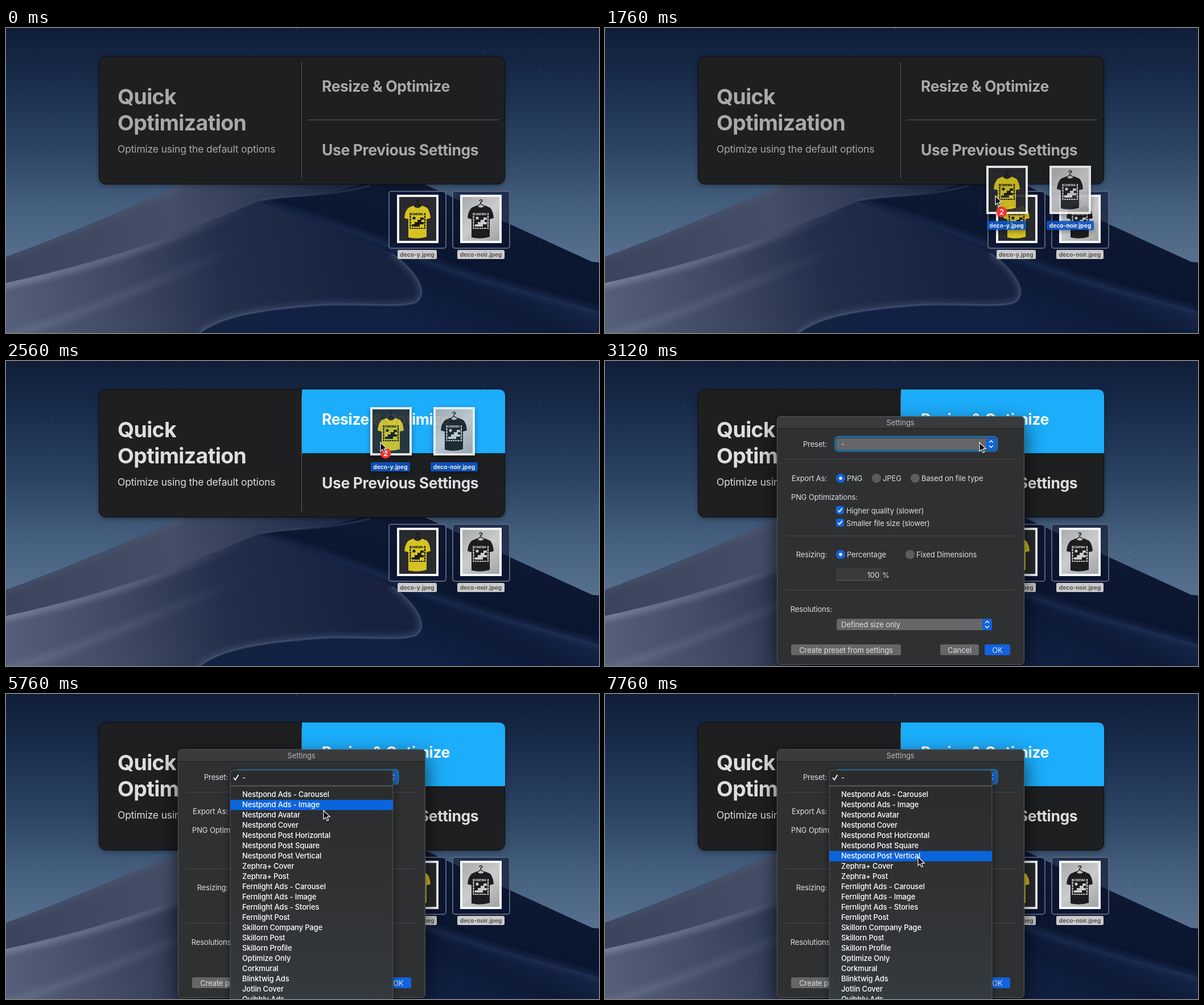
These frames come from a looping animation (1042 by 536 pixels, 8 s). An HTML page:

```html
<!DOCTYPE html>
<html lang="en">
<head>
<meta charset="utf-8">
<title>Drop to optimize</title>
<style>
  html, body { margin: 0; width: 100%; height: 100%; overflow: hidden; background: #0f1c36; }
  svg { display: block; width: 1042px; height: 536px; }
  text { font: 13px Inter, "Noto Sans", sans-serif; letter-spacing: -.01em; font-optical-sizing: none; fill: #dededf; white-space: pre; }
  .h1 { font-size: 37.5px; font-weight: 700; letter-spacing: -.018em; }
  .h2 { font-size: 26.5px; font-weight: 700; letter-spacing: -.0145em; }
  .sub { font-size: 17.5px; letter-spacing: -.0095em; }
  .name { font-size: 10.2px; font-weight: 700; letter-spacing: 0; }
  .tiny { font-size: 5.2px; font-weight: 800; letter-spacing: 0; }
  .item { font-weight: 500; letter-spacing: -.012em; fill: #fff; }
  .end { text-anchor: end; }
  .mid { text-anchor: middle; }
  #panel text { fill: #a9a9aa; }
  #panel.lit text { fill: #dededf; }
  #panel.hot .resize { fill: #fff; }
  #hot { display: none; }
  .hot #hot { display: block; }
  .hot #rule { display: none; }
  .soft { fill: none; filter: blur(6px); }
  .glow { fill: none; filter: blur(1.2px); }
</style>
</head>
<body>
<script>
const LOOP = 8000, STEP = 80;

const rect = (x, y, w, h, fill, r = 0, more = '') =>
  `<rect x="${x}" y="${y}" width="${w}" height="${h}" rx="${r}" fill="${fill}" ${more}/>`;
const text = (x, y, s, cls = '', more = '') => `<text x="${x}" y="${y}" class="${cls}" ${more}>${s}</text>`;
const line = (x1, y1, x2, y2, color) => `<path d="M${x1} ${y1}L${x2} ${y2}" stroke="${color}"/>`;
const gradient = (id, coords, ...stops) => {
  const [x1, y1, x2, y2] = coords;
  return `<linearGradient id="${id}" gradientUnits="userSpaceOnUse" x1="${x1}" y1="${y1}" x2="${x2}" y2="${y2}">` +
    stops.map(([at, color]) => `<stop offset="${at}" stop-color="${color}"/>`).join('') + '</linearGradient>';
};

// Night desert
const HILL = 'M0 402C90 370 200 323 310 276L400 240H650C740 272 810 312 886 345L960 379 1030 411 1042 412V536H0Z';
const SHADE = 'M445 304C480 294 560 298 625 274L660 244C740 272 810 312 886 345L960 379 1030 411 1042 412V536H340L450 400Z';
const RIDGE = 'M448 306C540 332 640 366 720 400S930 466 1042 498';
const TIP = 'C722 428 744 466 720 482C690 494 600 481 540 488C450 495 380 505 340 536';
const TONGUE = `M0 448C110 424 250 388 445 304C500 330 600 356 678 396${TIP}H0Z`;

function stars() {
  let seed = 7, out = '';
  const rnd = () => (seed = seed * 16807 % 2147483647) / 2147483647;
  for (let i = 0; i < 170; i++)
    out += rect((rnd() * 1042).toFixed(1), (rnd() * 390).toFixed(1), 1, 1, '#c8d8ee', 0, `opacity="${(.12 + rnd() ** 3 * .6).toFixed(2)}"`);
  return out;
}

const desert = `<defs>
  ${gradient('sky', [0, 0, 0, 420], [0, '#101d39'], [.22, '#192c4b'], [.5, '#2c4464'], [.75, '#455f7e'], [1, '#587290'])}
  ${gradient('hill', [0, 420, 600, 300], [0, '#3a445d'], [.5, '#444e67'], [.75, '#303b56'], [1, '#1d2946'])}
  ${gradient('shade', [700, 270, 640, 536], [0, '#0e1934'], [.5, '#0a152f'], [1, '#122342'])}
  ${gradient('slope', [820, 400, 760, 536], [0, '#172748'], [.4, '#0d1a38'], [1, '#112144'])}
  ${gradient('tongue', [0, 500, 620, 400], [0, '#555f79'], [.35, '#3d4762'], [.62, '#232f4a'], [1, '#16223f'])}
  ${gradient('sheen', [0, 0, 430, 0], [0, '#9099b0cc'], [.5, '#8089a2a0'], [1, '#8089a200'])}
  <clipPath id="inHill"><path d="${HILL}"/></clipPath>
  <clipPath id="inTongue"><path d="${TONGUE}"/></clipPath>
  </defs>
  ${rect(0, 0, 1042, 536, 'url(#sky)')}
  ${stars()}
  <path d="${HILL}" fill="url(#hill)"/>
  <g clip-path="url(#inHill)">
    <path class="soft" d="M0 405C90 373 200 326 310 279" stroke="#68738c" stroke-width="5" opacity=".4"/>
    <path d="${SHADE}" fill="url(#shade)"/>
    <path d="${RIDGE}V536H448Z" fill="url(#slope)"/>
    <path class="soft" d="${RIDGE}" stroke="#2f4470" stroke-width="7" opacity=".6"/>
    <path class="glow" d="M445 304C480 294 560 298 640 277" stroke="#7684a3" stroke-width="1.5" opacity=".5"/>
  </g>
  <path d="${TONGUE}" fill="url(#tongue)"/>
  <g clip-path="url(#inTongue)">
    <path class="soft" d="M-20 454C110 428 250 392 440 308" stroke="url(#sheen)" stroke-width="10"/>
    <path class="soft" d="M-20 550C150 500 270 440 430 380" stroke="url(#sheen)" stroke-width="14" opacity=".35"/>
    <path class="soft" d="M678 396${TIP}" stroke="#5e7098" stroke-width="8" opacity=".5"/>
  </g>
  <path class="glow" d="M678 396${TIP}" stroke="#7f8dad" stroke-width="1.5" opacity=".6"/>`;

// Files
const thumb = (x, wall, shirt, ink) => `<g transform="translate(${x} 293)">
  ${rect(0, 0, 73, 85, '#f6f6f6')}${rect(4, 4, 65, 77, wall)}
  <path d="M29 21L36 16 44 21M36 16V13C40 12 39 8 36 9Q34 9 34 11" fill="none" stroke="#111" stroke-width="1.3"/>
  <path d="M29 19Q36 27 44 19L53 23Q58 29 59 41L52 43V74Q36 79 20 75V43L13 41Q14 29 20 23Z" fill="${shirt}"/>
  <path d="M29 19Q36 27 44 19" fill="none" stroke="#0008"/>
  ${text(25, 36, 'CINEMA', 'tiny', `style="fill:${ink}"`)}
  <path d="M23.5 32V60M49 32V60" stroke="${ink}" stroke-width="2.2" stroke-dasharray="4 1"/>
  <path d="M26 59H47" stroke="${ink}" stroke-width="1.8" stroke-dasharray="3 1"/>
  <circle cx="30" cy="41" r="2.6" fill="${ink}"/>
  <path d="M26 56V52H31V48H36V44H41V40H47V44H43V48H47V52H40V56Z" fill="${ink}"/></g>`;
const thumbs = thumb(687, '#292a2d', '#d6c322', '#1b1b18') + thumb(798, 'url(#wall)', '#1c1d1f', '#c9c9c9');
const labels = (bg, ink) => [[688, 69, 'deco-y.jpeg'], [793, 83, 'deco-noir.jpeg']].map(([x, w, s]) =>
  rect(x, 390, w, 16, bg, 2.5) + text(x + w / 2, 402, s, 'name mid', `style="fill:${ink}"`)).join('');
const files = `<defs>${gradient('wall', [4, 4, 69, 81], [0, '#a9aaac'], [.5, '#cbcccd'], [1, '#a2a3a5'])}</defs>` +
  [673, 785].map(x => rect(x, 287, 100, 100, '#0a153199', 4, 'stroke="#5a6276" stroke-width="2"')).join('') +
  thumbs + labels('#cbcbcb', '#565656');
const drag = `<g id="drag"><g opacity=".9" style="filter:drop-shadow(0 3px 4px #0006)">${thumbs}${labels('#0b55c4', '#fff')}</g>
  <circle cx="714" cy="374" r="9.3" fill="#f5302f"/>${text(714, 378.6, '2', 'mid', 'style="fill:#fff;font-weight:600"')}</g>`;

// Drop panel
const panel = `<g id="panel">
  ${rect(163.5, 50, 713, 224.5, '#1e1f21', 12, 'stroke="#0b0d12" style="filter:drop-shadow(0 2px 4px #0005)"')}
  <path id="hot" d="M520 50H865Q877 50 877 62V162H520Z" fill="#1cadfb"/>
  ${line(519.5, 60, 519.5, 264, '#5b5c5e')}<g id="rule">${line(530, 161.5, 866, 161.5, '#5b5c5e')}</g>
  ${text(196, 134, 'Quick', 'h1')}${text(196, 180, 'Optimization', 'h1')}
  ${text(196, 219, 'Optimize using the default options', 'sub')}
  ${text(555, 112, 'Resize &amp; Optimize', 'h2 resize')}${text(555, 224, 'Use Previous Settings', 'h2')}</g>`;

// Settings dialog; y is the middle of each row
const GREY = '#656668', BLUE = '#1163de';
const label = (x, y, s, cls) => text(x, y + 4.7, s, cls);
const radio = (x, y, s, on) => `<circle cx="${x}" cy="${y}" r="8" fill="${on ? BLUE : '#5b5c5e'}"/>` +
  (on ? `<circle cx="${x}" cy="${y}" r="2.7" fill="#fff"/>` : '') + label(x + 11, y + .5, s);
const check = (y, s) => rect(406, y - 7, 14, 14, BLUE, 3) +
  `<path d="M409.5 ${y}l2.6 3.2 4.6-6.6" fill="none" stroke="#fff" stroke-width="1.8"/>` + label(424, y + 1, s);
const popup = (y, right, s) => rect(407, y - 10, right - 407, 20, GREY, 3.5) + rect(right - 17, y - 10, 17, 20, BLUE, 3.5) +
  `<path d="M${right - 12} ${y - 2.5}l3.5-3.5 3.5 3.5m0 5l-3.5 3.5-3.5-3.5" fill="none" stroke="#fff" stroke-width="1.4"/>` +
  label(415, y + .5, s);
const button = (x, w, s, fill = GREY) => rect(x, 498, w, 19, fill, 3) + label(x + w / 2, 508, s, 'mid');

const dialog = `<g id="dialog" style="filter:drop-shadow(0 14px 18px #000a)">
  ${rect(302.5, 97.5, 434, 436, '#2f3032', 6, 'stroke="#58595b"')}
  <path d="M303 119V104Q303 98 309 98H730Q736 98 736 104V119Z" fill="#3a3b3d"/>${line(303, 118.5, 736, 118.5, '#1c1d1e')}
  ${text(519, 113, 'Settings', 'mid', 'style="fill:#b6b6b7"')}
  ${[172.5, 307.5, 402.5].map(y => line(318, y, 721, y, '#47484a')).join('')}
  ${label(390, 146, 'Preset:', 'end')}
  ${rect(405, 133.5, 284, 24.5, 'none', 5, 'stroke="#1f6c9c" stroke-width="3.5"')}${popup(146, 687, '-')}
  ${label(390, 206.5, 'Export As:', 'end')}${radio(414, 206, 'PNG', 1)}${radio(477, 206, 'JPEG')}${radio(545, 206, 'Based on file type')}
  ${label(327, 239.5, 'PNG Optimizations:')}${check(262, 'Higher quality (slower)')}${check(284, 'Smaller file size (slower)')}
  ${label(390, 340.5, 'Resizing:', 'end')}${radio(414, 340, 'Percentage', 1)}${radio(536, 340, 'Fixed Dimensions')}
  ${rect(406, 364, 81, 22, '#3a3b3d')}${line(406, 385.5, 487, 385.5, '#58595b')}
  ${label(482, 376.5, '100', 'end')}${label(487, 376, '%')}
  ${label(399, 436.5, 'Resolutions:', 'end')}${popup(463, 680, 'Defined size only')}
  ${button(327, 193, 'Create preset from settings')}${button(589, 68, 'Cancel')}${button(667, 45, 'OK', BLUE)}</g>`;

// Preset menu
const ROW0 = 168, ROW = 18;
const presets = [
  ...['Ads - Carousel', 'Ads - Image', 'Avatar', 'Cover', 'Post Horizontal', 'Post Square', 'Post Vertical'].map(s => 'Nestpond ' + s),
  'Zephra+ Cover', 'Zephra+ Post',
  ...['Ads - Carousel', 'Ads - Image', 'Ads - Stories', 'Post'].map(s => 'Fernlight ' + s),
  ...['Company Page', 'Post', 'Profile'].map(s => 'Skillorn ' + s),
  'Optimize Only', 'Corkmural', 'Blinktwig Ads', 'Jotlin Cover', 'Quibbly Ads'];
const menu = `<defs>${gradient('menuFill', [0, 134, 0, 536], [0, '#2a2b2d'], [.6, '#313335'], [1, '#343a3e'])}</defs>
  <g id="menu">${rect(394, 134, 286, 420, 'url(#menuFill)', 5, 'stroke="#56585a" style="filter:drop-shadow(0 4px 6px #0008)"')}
  ${rect(394, 160.5, 286, 2, '#56585a')}
  ${rect(394, 0, 286, ROW, '#0a64dc', 0, 'id="pick"')}
  <path d="M400 147l3 4 5.5-9" fill="none" stroke="#fff" stroke-width="1.8"/>
  ${text(415, 151, '-', 'item')}
  ${presets.map((s, i) => text(415, ROW0 + ROW * i + 13.2, s, 'item')).join('')}</g>`;

const cursor = `<path id="cursor" d="M0 0V15.6L3.6 12.4 6.1 18.2 8.7 17.1 6.3 11.4H11.2Z" fill="#0b0b0b" stroke="#fff" stroke-width="1.2" style="filter:drop-shadow(0 1px 1px #0008)"/>`;

document.body.innerHTML = `<svg viewBox="0 0 1042 536">${desert}${panel}${files}${drag}${dialog}${menu}${cursor}</svg>`;

// Motion: [time, x, y]
const pointerKeys = [
  [240, 735, 494], [600, 696, 313], [960, 704, 352], [1520, 704, 352], [1760, 686, 295], [2080, 669, 218],
  [2400, 660, 164], [2560, 658, 143], [3680, 658, 143], [4080, 600, 139], [4240, 598, 139], [4720, 598, 139],
  [5760, 558, 204.5], [6480, 550, 251], [6880, 549.5, 265], [7040, 549.5, 265], [7120, 550, 264], [7360, 550, 264], [7760, 550, 286]];
const dragKeys = [[1520, 0, 0], [1760, -17, -51], [2080, -34, -132], [2400, -45, -191], [2560, -47, -212]];

function at(keys, t) {
  const i = keys.findIndex(k => k[0] > t);
  if (i < 1) return (i ? keys[keys.length - 1] : keys[0]).slice(1);
  const [t0, x0, y0] = keys[i - 1], [t1, x1, y1] = keys[i], u = (t - t0) / (t1 - t0);
  return [x0 + (x1 - x0) * u, y0 + (y1 - y0) * u];
}

const $ = id => document.getElementById(id);
const show = (id, on) => $(id).style.display = on ? 'inline' : 'none';
const move = (id, [x, y]) => $(id).setAttribute('transform', `translate(${x} ${y})`);

function draw(t) {
  const tip = at(pointerKeys, t);
  show('cursor', t >= 240);
  move('cursor', tip);
  show('drag', t >= 1600 && t < 2880);
  move('drag', at(dragKeys, t));
  $('panel').classList.toggle('lit', t >= 1920);
  $('panel').classList.toggle('hot', t >= 2480);

  const open = Math.min(1, (t - 2800) / 320), k = .9 + .1 * open;
  show('dialog', t >= 2880);
  $('dialog').setAttribute('opacity', Math.max(0, open));
  $('dialog').setAttribute('transform', `translate(519 315) scale(${k}) translate(-519 -315)`);

  const y = tip[1] - 2;
  show('menu', t >= 4080);
  show('pick', y < 156 || y >= ROW0);
  $('pick').setAttribute('y', y < 156 ? 137.5 : ROW0 + ROW * Math.floor((y - ROW0) / ROW));
}

function tick() {
  draw(Math.floor(performance.now() % LOOP / STEP) * STEP);
  requestAnimationFrame(tick);
}
tick();
</script>
</body>
</html>
```
